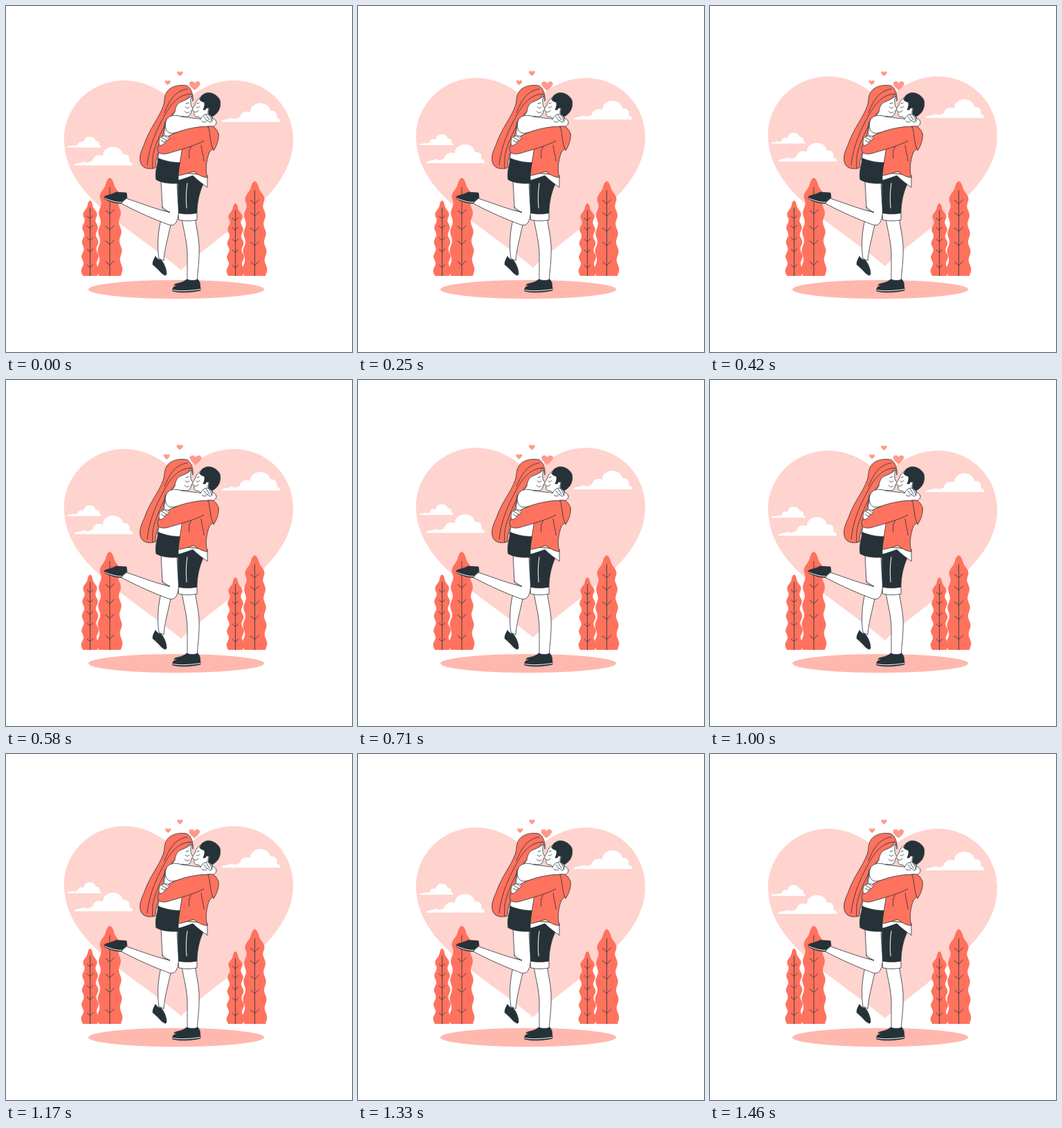
Recreate the animation shown at these times as an HTML page. Size 500 by 500 pixels, loop 1500 ms.

```html
<!DOCTYPE html>
<html lang="en">
<head>
<meta charset="utf-8">
<style>
  html, body { margin: 0; width: 100%; height: 100%; overflow: hidden; background: #fff; }
  svg { display: block; width: 100vw; height: 100vh; }
  .coral { fill: #ff725e; }
  .dark { fill: #263238; }
  .white { fill: #fff; }
  .ink { stroke: #263238; stroke-width: .8; stroke-linecap: round; stroke-linejoin: round; }
  .line { fill: none; }
  .trim { fill: none; stroke: #fff; stroke-width: 1; }
</style>
</head>
<body>
<svg viewBox="0 0 500 500">
  <defs>
    <path id="cloud" d="M0 0C1-3 6-4 11-4C13-6 17-6 19-4C23-5 25-6 27-7C28-13 34-17 42-14C42-22 49-27 56-27C65-27 70-22 71-16C78-17 82-12 80-6C84-5 86-2 85 0Z"/>
    <path id="love" d="M0 6.5C-3 4-8-.2-8-3.2C-8-7-2.5-8.2 0-4C2.5-8.2 8-7 8-3.2C8-.2 3 4 0 6.5Z"/>
  </defs>

  <g class="float">
    <path fill="#ffd3ce" d="M250 149C235 128 205 108 171 108C123 108 84 146 84 193C84 275 178 319 253 382C322 318 415 272 415 193C415 146 377 108 329 108C295 108 265 128 250 149Z"/>
  </g>
  <g class="float white">
    <use href="#cloud" transform="translate(311 168)"/>
    <use href="#cloud" transform="translate(98 231)"/>
    <use href="#cloud" transform="translate(88 205) scale(.585)"/>
  </g>
  <g id="trees"></g>
  <ellipse cx="246" cy="409.5" rx="127" ry="13.5" fill="#ffb8ae"/>

  <g id="hearts" fill="#ff998b">
    <use href="#love" transform="translate(272.3 115.3) scale(.97)"/>
    <use href="#love" transform="translate(251.5 98.2) scale(.53)"/>
    <use href="#love" transform="translate(234.2 110.8) scale(.51)"/>
  </g>

  <g class="ink">
    <!-- legs and shoes -->
    <path class="white" d="M224 308C220 325 218 345 221 365L228 368C229 352 234 335 238 316Z"/>
    <path class="dark" d="M216 362C218 365 221 367 224 367C228 371 232 380 232 387C231 391 227 389 224 386C220 380 213 377 212 373C212 369 214 365 216 362Z"/>
    <path class="trim" d="M212.500 375C220 380 223 387 229 389.500"/>
    <path class="white" d="M254 305C256 325 263 340 262 368C262 380 262 392 262 399L276 399C277 383 280 365 279 345C278 330 275 320 273 305Z"/>
    <path class="dark" d="M243 403C246 400 255 401 261 395C266 397 273 397 277 395C280 398 281 402 280 405L262 407Z"/>
    <path class="dark" d="M241 408C242 403 254 405 261 400C266 402 273 402 279 401C281 404 281 408 281 411C268 414 251 415 241 412Z"/>
    <path class="trim" d="M241.500 410.500C253 413 269 411 280.500 409.500"/>
    <path class="white" d="M249 299L276 299L276 309C268 311 258 311 250 309Z"/>
    <path class="dark" d="M249 246L272 246L285 257C279 270 276 285 276 299C268 301 257 301 249 299Z"/>
    <path class="trim" d="M262 256C260 268 260 281 261 292"/>
    <path class="white" d="M224 252L226 292C229 296 233 297 237 298C221 295 200 287 174 278L166 285C190 298 216 309 235 316C243 319 248 313 249 302C250 295 248 280 247 254Z"/>
    <path class="line" d="M226 290C229 295 234 295 236 299"/>
    <path class="dark" d="M142 276C144 273 153 273 159 269L174 270L175 277C172 279 169 281 167 285C159 286 149 282 143 279Z"/>
    <path class="trim" d="M143 278C151 281 159 284 167 283.500"/>

    <!-- torsos -->
    <path class="white" d="M233 161C228 174 230 188 225 202C221 210 220 217 219 223L254 229L262 170Z"/>
    <path class="dark" d="M220 220C230 224 242 227 254 226L250 256C238 257 226 256 217 251C215 239 219 230 220 220Z"/>
    <path class="white" d="M249 241L249 252C257 250 264 247 270 245C277 252 284 257 291 262L291 245Z"/>
    <path class="coral" d="M255 202C253 218 250 232 249 245C257 244 265 241 271 239C278 244 285 248 291 248C288 238 289 224 294 211C302 204 306 195 307 186C304 178 299 172 292 174C278 178 263 185 255 202Z"/>

    <!-- faces -->
    <path class="white" d="M281 132C276 135 274 139 273 143C271 146 269 149 269 150C269 152 272 151 272 153C271 157 273 161 278 160C281 161 281 165 281 169L296 171L300 154L293 135Z"/>
    <path class="dark" d="M280 135C282 132 281 130 285 128C292 122 305 127 309 136C311 145 308 153 301 158L296 160C292 158 292 153 294 149C293 146 289 147 288 150L285 150C287 145 288 141 286 139C284 138 281 138 280 135Z"/>
    <path class="white" d="M289 148C293 145 294 151 291 154"/>
    <path class="line" d="M276 141L279 140M275 146C277 148 279 147 280 145M273 153C275 154 277 153 278 151"/>
    <path class="white" d="M247 139C256 136 263 135 268 130C266 138 267 142 268 145C270 148 271 149 269 150C267 151 268 153 267 155C266 160 260 161 255 159L242 164L235 161Z"/>
    <path class="line" d="M260 141L264 140M259 146C261 148 263 148 265 146M258 152C260 155 263 155 265 153"/>

    <!-- long hair -->
    <path class="coral" d="M270 137C271 129 268 118 261 115C250 113 237 116 232 125C228 131 230 137 227 145C221 162 208 176 200 199C196 209 191 218 195 228C199 236 208 236 216 234C216 224 219 216 222 206C226 193 228 179 230 167C234 163 241 159 244 153C245 145 248 140 254 138C260 136 265 133 267 127C269 130 270 134 270 137Z"/>
    <path class="line" d="M267 127C249 128 239 141 231 155C219 176 207 201 204 230M262 120C246 122 237 134 229 154M244 153C232 164 224 182 217 200C212 213 211 223 212 235"/>

    <!-- her arms -->
    <path class="white" d="M232 164C237 157 246 157 254 160C266 161 281 164 289 163C295 160 303 162 304 168C304 173 299 175 293 175C276 174 258 181 240 184C231 184 228 174 232 164Z"/>
    <path class="white" d="M281 164C283 158 288 156 292 156C296 158 299 162 298 166C297 169 293 168 291 165C290 168 285 169 283 166"/>
    <path class="line" d="M286 160L290 165M289 157L294 165M292 156C294 159 297 162 297 166"/>

    <!-- his arm -->
    <path class="coral" d="M292 174C270 174 247 181 233 189C224 194 219 201 219 208C220 214 227 215 234 213C251 208 270 203 286 195"/>
    <path class="white" d="M222 202C220 197 221 190 225 189C229 187 234 187 236 190C237 193 233 194 231 195C229 198 227 201 225 201Z"/>
    <path class="line" d="M224 194L229 197M225 190L232 194M230 188L235 192M268 203C264 208 264 214 265 220M282 201C283 210 286 218 286 224"/>
    <path class="coral" d="M292 174C296 184 294 197 300 209C305 201 308 193 307 184C304 177 300 172 292 174Z"/>
  </g>
</svg>
<script>
  const LOOP = 1500;
  const LEAD = LOOP / 36;
  const BASE = 390;

  function tree(cx, top, halfWidth) {
    const height = BASE - top;
    const steps = 70;
    const edge = (side, i) => {
      const u = i / steps;
      const body = halfWidth * (.75 + .25 * u) * Math.min(1, (u / .2) ** .6);
      const ripple = 1.6 * Math.min(1, u * 8) * Math.sin(u * 33 - 4);
      const x = cx + side * (body + ripple);
      return x.toFixed(1) + ' ' + (top + height * u).toFixed(1);
    };
    const points = [];
    for (let i = 0; i <= steps; i++) points.push(edge(-1, i));
    for (let i = steps; i >= 0; i--) points.push(edge(1, i));

    const reach = halfWidth * .36;
    let twigs = `M${cx} ${top + height * .1}V${BASE}`;
    for (const u of [.24, .37, .53, .68, .89]) {
      const y = top + height * u;
      twigs += `M${cx - reach} ${y - reach * .85}L${cx} ${y}L${cx + reach} ${y - reach}`;
    }
    return `<path class="coral" d="M${points.join('L')}Z"/><path class="ink line" d="${twigs}"/>`;
  }

  document.getElementById('trees').innerHTML =
    tree(121.5, 281, 11.5) + tree(150, 248, 17) +
    tree(331.5, 285, 11.5) + tree(359.5, 253, 16.5);

  const floating = document.querySelectorAll('.float');
  const hearts = document.getElementById('hearts');

  // Two beats, then rest.
  function beat(u) {
    if (u < .28) return 1 - Math.abs(u - .14) / .14;
    if (u < .42) return (u - .28) / .14;
    return Math.max(0, (.7 - u) / .28);
  }

  function draw() {
    const u = (performance.now() + LEAD) % LOOP / LOOP;
    const lift = -10 * (1 - Math.abs(2 * u - 1));
    for (const part of floating) part.setAttribute('transform', `translate(0 ${lift})`);
    const scale = 1 + .1 * beat(u);
    hearts.setAttribute('transform', `translate(255 108) scale(${scale}) translate(-255 -108)`);
    requestAnimationFrame(draw);
  }
  draw();
</script>
</body>
</html>
```
